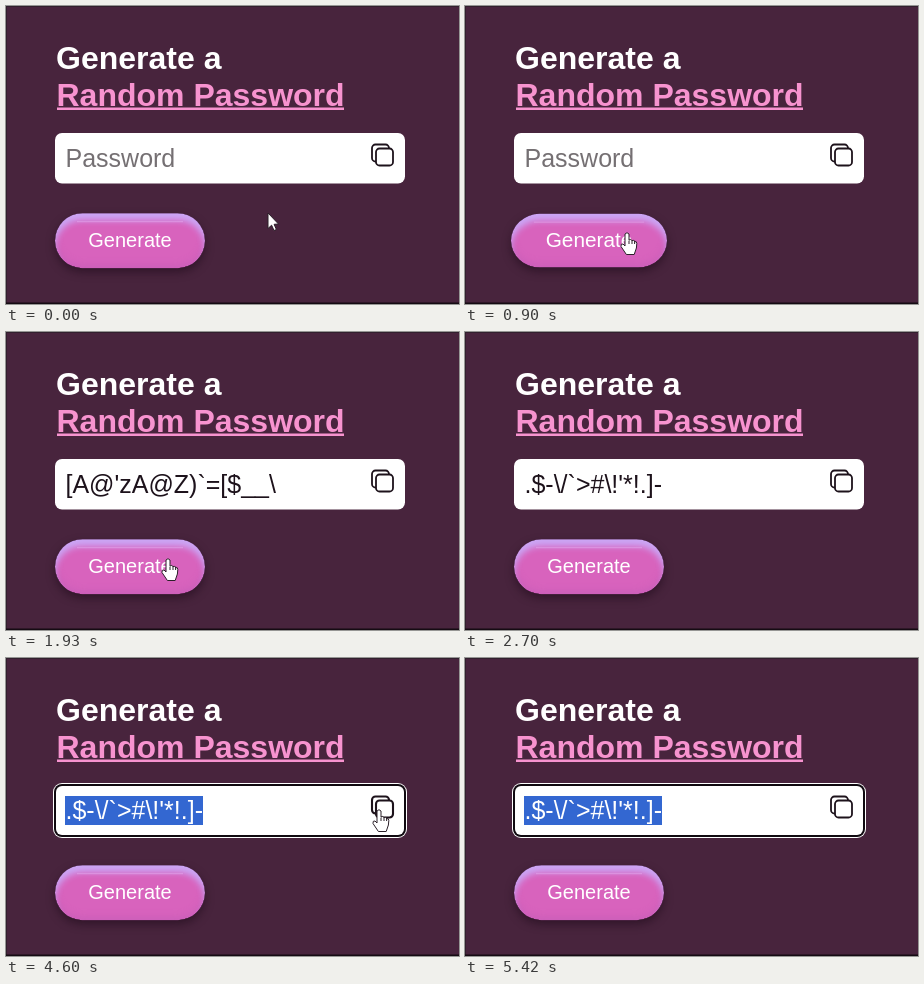
An HTML page with a canvas for the animation above (5630 ms loop, 453 by 298 pixels).

```html
<!DOCTYPE html>
<html lang="en">
<head>
<meta charset="utf-8">
<title>Random password generator</title>
<style>
html, body { margin: 0; width: 100%; height: 100%; overflow: hidden; background: #48243d; }
canvas { display: block; width: 453px; height: 298px; }
</style>
</head>
<body>
<canvas id="stage" width="453" height="298"></canvas>
<script>
const ctx = document.getElementById('stage').getContext('2d');
const LOOP = 5630;
const FONT = '"Liberation Sans", Arial, sans-serif';
const INK = '#1d121b';
const FIRST = "[A@'zA@Z)`=[$__\\";
const SECOND = ".$-\\/`>#\\!'*!.]-";

// Horizontal stretch of the button: [time, amount]
const WOBBLE = [[0, 0], [760, 0], [900, .04], [1000, .04], [1100, .01],
  [1250, .03], [1400, .04], [1730, .01], [1850, 0]];

// Pointer stretches: start, end, from, to
const MOVES = [
  { t0: 0, t1: 530, a: [262, 207], b: [262, 207] },
  { t0: 530, t1: 900, a: [262, 207], b: [162, 227] },
  { t0: 900, t1: 2440, a: [162, 227], b: [162, 227] },
  { t0: 2440, t1: 2660, a: [162, 227], b: [210, 184] },
  { t0: 3050, t1: 3330, a: [310, 176], b: [373, 152] },
  { t0: 3330, t1: 5050, a: [373, 152], b: [373, 152] },
  { t0: 5050, t1: 5330, a: [373, 152], b: [382, 262] }
];

const ease = p => p * p * (3 - 2 * p);
const mix = (a, b, p) => a + (b - a) * p;

function track(keys, t) {
  for (let i = 1; i < keys.length; i++) {
    const [t0, a] = keys[i - 1], [t1, b] = keys[i];
    if (t < t1) return mix(a, b, ease((t - t0) / (t1 - t0)));
  }
  return keys[keys.length - 1][1];
}

function box(x, y, w, h, r) {
  ctx.beginPath();
  ctx.roundRect(x, y, w, h, r);
}

function text(str, x, y, size, color, weight = '') {
  ctx.font = `${weight} ${size}px ${FONT}`;
  ctx.fillStyle = color;
  ctx.fillText(str, x, y);
}

function backdrop() {
  ctx.fillStyle = '#48243d';
  ctx.fillRect(0, 0, 453, 298);
  ctx.fillStyle = '#32202e';
  ctx.fillRect(0, 0, 453, 1);
  ctx.fillRect(0, 0, 1, 298);
  ctx.fillStyle = '#150b13';
  ctx.fillRect(0, 296.5, 453, 1.5);
}

function heading() {
  text('Generate a', 50, 63, 32, '#fff', 'bold');
  text('Random Password', 50.5, 100, 32, '#f793cf', 'bold');
  ctx.fillRect(51, 101.5, 287, 2.5);
}

function field(t) {
  const focus = t >= 4600;
  ctx.fillStyle = '#fff';
  if (focus) {
    box(47, 125, 354, 55, 9);
    ctx.fill();
    ctx.fillStyle = '#100a10';
    box(48, 126, 352, 53, 8);
    ctx.fill();
    ctx.fillStyle = '#fff';
    box(50, 128, 348, 49, 6);
  } else {
    box(49, 127, 350, 50.5, 7);
  }
  ctx.fill();
  if (focus) {
    ctx.fillStyle = '#3367d1';
    ctx.fillRect(59, 138, 138, 29);
  }
  if (t < 1100) text('Password', 59.5, 161, 25, '#757073');
  else text(t < 2130 ? FIRST : SECOND, 59.5, 161, 25, focus ? '#fff' : INK);
}

function copyIcon(t) {
  ctx.strokeStyle = INK;
  ctx.fillStyle = '#fff';
  ctx.lineWidth = t >= 3330 && t < 5050 ? 2.1 : 1.8;
  box(366, 138.5, 17, 17, 3.5);
  ctx.stroke();
  box(370, 142.5, 17, 17, 3.5);
  ctx.fill();
  ctx.stroke();
}

function insetShadow(dy, blur, color) {
  ctx.shadowColor = color;
  ctx.shadowBlur = blur;
  ctx.shadowOffsetY = dy;
  ctx.fillStyle = '#000';
  ctx.beginPath();
  ctx.rect(-140, -100, 280, 200);
  ctx.roundRect(-75, -27.5, 150, 55, 27.5);
  ctx.fill('evenodd');
}

function button(t) {
  const s = track(WOBBLE, t);
  ctx.save();
  ctx.translate(124, 234.7);
  ctx.scale(1 + s, 1 - s * .6);

  ctx.save();
  ctx.shadowColor = 'rgba(25,8,22,.5)';
  ctx.shadowBlur = 8;
  ctx.shadowOffsetY = 4;
  ctx.fillStyle = '#d863bd';
  box(-75, -27.5, 150, 55, 27.5);
  ctx.fill();
  ctx.restore();

  ctx.save();
  box(-75, -27.5, 150, 55, 27.5);
  ctx.clip();
  insetShadow(-3, 7, 'rgba(196,92,184,.7)');
  insetShadow(7, 6, '#cba6f5');
  ctx.restore();

  ctx.fillStyle = 'rgba(232,184,246,.45)';
  ctx.fillRect(-53, -19.5, 106, 1);
  text('Generate', -41.7, 6.5, 20, '#fff');
  ctx.restore();
}

function arrow() {
  ctx.beginPath();
  [[0, 0], [0, 15.5], [3.6, 12.2], [6, 17.5], [8.4, 16.5], [6.1, 11.3], [10.5, 11]]
    .forEach(([x, y]) => ctx.lineTo(x, y));
  ctx.closePath();
  ctx.fill();
  ctx.stroke();
}

function hand() {
  ctx.beginPath();
  ctx.moveTo(-2, 13);
  ctx.lineTo(-2, 1);
  ctx.quadraticCurveTo(0, -1.6, 2, 1);
  ctx.lineTo(2, 7);
  ctx.quadraticCurveTo(4, 5.6, 5, 7.6);
  ctx.quadraticCurveTo(7, 6.6, 7.6, 8.6);
  ctx.quadraticCurveTo(9.8, 8, 9.8, 10.5);
  ctx.lineTo(9.4, 15);
  ctx.lineTo(7.2, 21.5);
  ctx.lineTo(-.6, 21.5);
  ctx.lineTo(-6, 13.5);
  ctx.quadraticCurveTo(-6.4, 10.4, -4, 11);
  ctx.closePath();
  ctx.fill();
  ctx.stroke();
  ctx.beginPath();
  for (const x of [2, 5, 7.6]) {
    ctx.moveTo(x, 7.6);
    ctx.lineTo(x, 11);
  }
  ctx.stroke();
}

function pointer(t) {
  const m = MOVES.find(m => t >= m.t0 && t < m.t1);
  if (!m) return;
  const p = ease((t - m.t0) / (m.t1 - m.t0));
  const x = mix(m.a[0], m.b[0], p), y = mix(m.a[1], m.b[1], p);
  const overButton = x < 199 && y > 207;
  const overIcon = x > 364 && y < 162;
  ctx.save();
  ctx.translate(x, y);
  ctx.fillStyle = '#fff';
  ctx.strokeStyle = '#2b2029';
  ctx.lineWidth = 1;
  if (overButton || overIcon) hand();
  else arrow();
  ctx.restore();
}

function draw(t) {
  backdrop();
  heading();
  field(t);
  copyIcon(t);
  button(t);
  pointer(t);
}

const start = performance.now();
function frame() {
  draw((performance.now() - start) % LOOP);
  requestAnimationFrame(frame);
}
frame();
</script>
</body>
</html>
```
